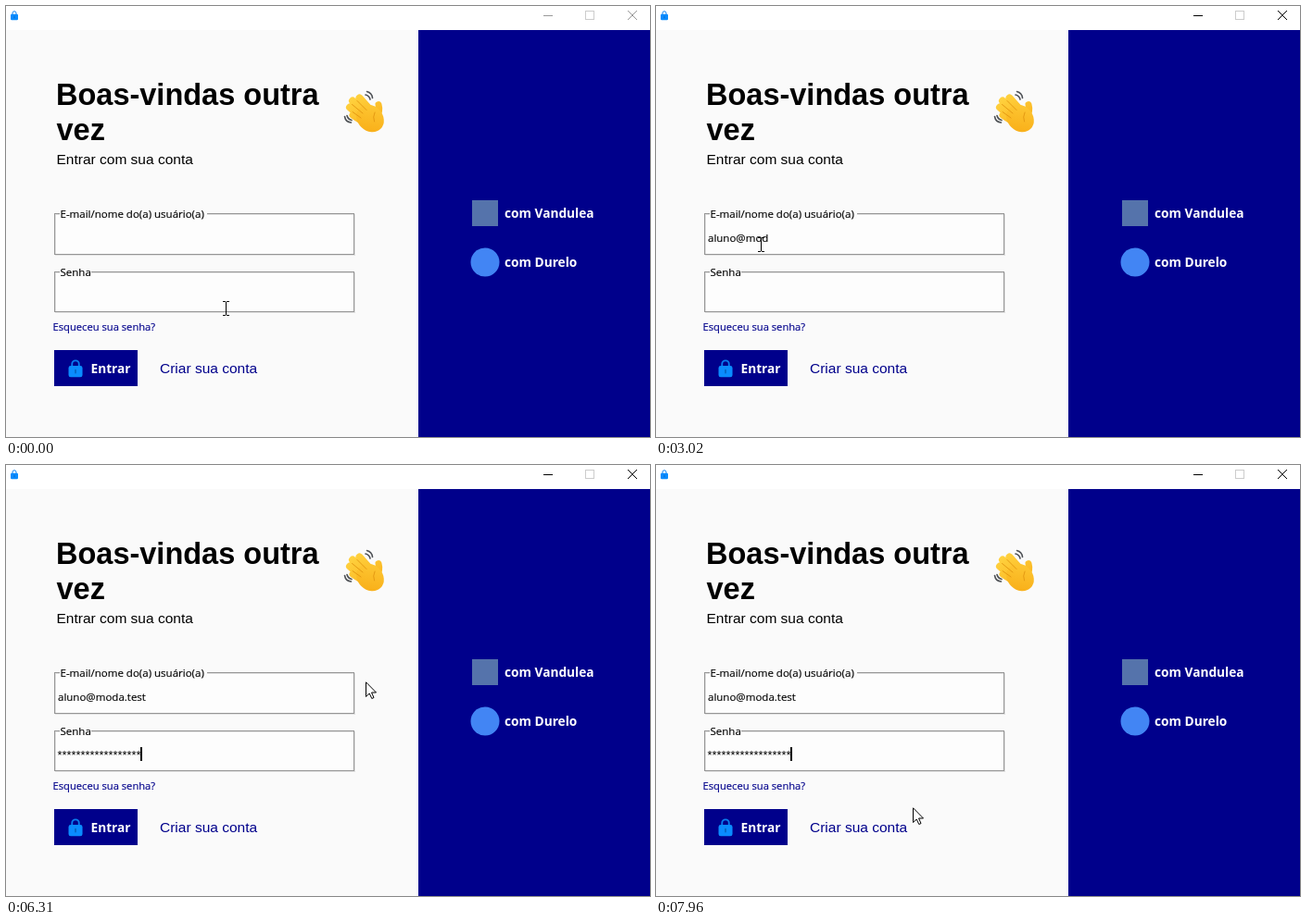
Recreate the animation shown at these times as an HTML page. Size 695x466 px, loop 8000 ms.

```html
<!DOCTYPE html>
<html lang="pt">
<head>
<meta charset="utf-8">
<title>Entrar</title>
<style>
  html, body { margin: 0; width: 100%; height: 100%; overflow: hidden; background: #fafafa; }
  svg { display: block; width: 695px; height: 466px; }
  text { white-space: pre; }
  .ui { font: 11.5px "Open Sans", "Noto Sans", sans-serif; stroke: #000; stroke-width: .15px; }
  .link { font-size: 11.2px; stroke: #00008b; }
  .bold { font: bold 13.7px "Open Sans", "Noto Sans", sans-serif; fill: #fff; }
  .body { font: 15.5px "Liberation Sans", sans-serif; }
  .title { font: bold 32.5px "Liberation Sans", sans-serif; }
  .stars { font: 12.85px "Liberation Sans", sans-serif; }
  .navy { fill: #00008b; }
  .crisp { shape-rendering: crispEdges; }
  .line { fill: none; }
  .groove { fill: #fdfdfd; stroke: #e1e1e1; }
  .edge { fill: none; stroke: #969696; }
</style>
</head>
<body>
<svg viewBox="0 0 695 466">
  <defs>
    <linearGradient id="skin" gradientUnits="userSpaceOnUse" x1="374" y1="98" x2="400" y2="134">
      <stop offset="0" stop-color="#ffd23f"/>
      <stop offset="1" stop-color="#f9b01a"/>
    </linearGradient>
    <g id="lock">
      <path d="M4 9V5.500a4 4 0 0 1 8 0V9" fill="none" stroke="#0a7ff0" stroke-width="2"/>
      <rect y="7.500" width="16" height="13" rx="2.500" fill="#0a8cff"/>
      <path d="M8 12.500v3" stroke="#0668c8" stroke-width="2" stroke-linecap="round"/>
    </g>
    <g id="sunken" class="line">
      <path d="M1 45V1H152" stroke="#000030" stroke-width="2"/>
      <path d="M151 1V44H1" stroke="#7f7fc5" stroke-width="2"/>
    </g>
  </defs>

  <rect width="695" height="466" fill="#fafafa"/>
  <rect width="695" height="26" fill="#fff"/>
  <rect x="445" y="26" width="250" height="440" class="navy"/>

  <use href="#lock" transform="translate(5 5) scale(.5)"/>
  <g id="controls" class="line">
    <path d="M580 10.500h10" class="crisp"/>
    <path d="M671 5l10 10M681 5l-10 10"/>
  </g>
  <rect x="625.500" y="5.500" width="9" height="9" class="line crisp" stroke="#ccc"/>

  <g class="title"><text x="54" y="107">Boas-vindas outra</text><text x="54.500" y="145">vez</text></g>
  <text class="body" x="54.500" y="171">Entrar com sua conta</text>

  <g stroke-linecap="round" fill="none">
    <g stroke="url(#skin)" stroke-width="8">
      <path d="M397 117L381.500 99.500M392 121L374 102.500M389 125L371 109.500M390 128L374.500 118"/>
      <path d="M400 122Q404 113 402 106.500" stroke-width="7"/>
    </g>
    <ellipse cx="393" cy="121.500" rx="16" ry="13.500" fill="url(#skin)" transform="rotate(45 393 121.500)"/>
    <path d="M389 112.500L379 102.500M385 116L373.500 106.500M383 121L374 114.500M398 115Q395.500 120 397.500 125" stroke="#e59a13"/>
    <path d="M388 96q4 1 5 5M389.500 92.500q5.500 1.500 6 7M368 118.500q1 4 5 5M365.500 119.500q1 6 7 6.500" stroke="#505357" stroke-width="1.600"/>
  </g>

  <g class="crisp">
    <rect class="groove" x="53.500" y="225.500" width="323" height="44"/>
    <rect class="edge" x="52.500" y="224.500" width="323" height="44"/>
    <rect class="groove" x="53.500" y="288.500" width="323" height="43"/>
    <rect class="edge" x="52.500" y="287.500" width="323" height="43"/>
  </g>
  <rect x="58" y="220" width="159" height="10" fill="#fafafa"/>
  <text class="ui" x="58.500" y="229">E-mail/nome do(a) usuário(a)</text>
  <rect x="58" y="283" width="34" height="10" fill="#fafafa"/>
  <text class="ui" x="58.500" y="292">Senha</text>
  <text id="email" class="ui" x="56" y="255"></text>
  <text id="password" class="stars" x="55.500" y="318"></text>
  <rect id="caret" class="crisp" width="2" height="15"/>

  <text class="ui link navy" x="50.500" y="351">Esqueceu sua senha?</text>
  <rect x="52" y="372" width="90" height="39" class="navy"/>
  <use href="#lock" transform="translate(67.500 382) scale(.94)"/>
  <text class="bold" x="91.500" y="397">Entrar</text>
  <text class="body navy" x="166" y="397">Criar sua conta</text>

  <use id="press0" href="#sunken" x="496" y="203"/>
  <g id="button0">
    <rect x="503" y="210" width="28" height="28" fill="#5573ab"/>
    <text class="bold" x="538" y="229">com Vandulea</text>
  </g>
  <use id="press1" href="#sunken" x="496" y="256"/>
  <g id="button1">
    <circle cx="517" cy="277" r="15.500" fill="#4285f4"/>
    <text class="bold" x="538" y="282">com Durelo</text>
  </g>

  <circle id="click" r="12" fill="#fff000" fill-opacity=".55"/>
  <g id="cursor">
    <path id="beam" class="line crisp" stroke="#000" d="M-3 -7.500h3M1 -7.500h3M.5 -7v14M-3 7.500h3M1 7.500h3"/>
    <path id="arrow" fill="#fff" stroke="#000" d="M.5 .8V16.500L4.200 13L6.800 18.500L9 17.500L6.500 12H11.500Z"/>
    <path id="hand" fill="#fff" stroke="#000" stroke-linejoin="round"
      d="M-1.500 2Q.5 -.5 2.500 2V7.500Q4.500 6 5.500 8Q7 6.800 8 9Q10 8.500 10.500 11V16Q10 19 8.500 20V23H0V20.500L-5.500 13.500Q-5 10.500 -1.500 13Z"/>
  </g>
</svg>
<script>
  const LOOP = 8000, STEP = 68;
  const el = id => document.getElementById(id);
  const between = (t, a, b) => t >= a && t < b;
  const show = (id, on) => el(id).style.display = on ? "" : "none";

  // Pointer moves: start, end, x, y
  const START = [237, 327];
  const MOVES = [
    [70, 480, 113, 258], [6030, 6580, 585, 216], [7060, 7300, 579, 275],
    [7610, 7820, 424, 357], [7890, 7890, 335, 380], [7960, 7960, 277, 370]
  ];
  // Clicks: start, end, x, y
  const CLICKS = [[550, 700, 111, 257], [6650, 6790, 585, 216], [7340, 7480, 579, 275]];
  const EMAIL = "aluno@moda.test";
  // Typing bursts: start, interval, characters
  const EMAIL_KEYS = [[1630, 95, 5], [2420, 0, 1], [2680, 155, 5], [3550, 100, 4]];
  const STAR_KEYS = [[4480, 55.5, 18]];

  function typed(t, bursts) {
    let count = 0;
    for (const [start, gap, max] of bursts)
      if (t >= start) count += gap ? Math.min(max, 1 + Math.floor((t - start) / gap)) : max;
    return count;
  }

  function pointer(t) {
    let [x, y] = START;
    for (const [start, end, toX, toY] of MOVES) {
      if (t < start) break;
      const steps = Math.round((end - start) / STEP) + 1;
      const p = Math.min(1, (Math.floor((t - start) / STEP) + 1) / steps);
      const eased = p * p * (3 - 2 * p);
      x += (toX - x) * eased;
      y += (toY - y) * eased;
    }
    return [Math.round(x), Math.round(y)];
  }

  function shapeAt(x, y) {
    if (between(x, 496, 648) && (between(y, 203, 248) || between(y, 256, 301))) return "hand";
    if (between(x, 54, 375) && (between(y, 226, 268) || between(y, 289, 331))) return "beam";
    return "arrow";
  }

  function drawCaret(t) {
    const inPassword = t >= 3950;
    const focused = inPassword ? 3950 : 550;
    const phase = (t - focused) % 900;
    const width = el(inPassword ? "password" : "email").getComputedTextLength();
    show("caret", t >= focused && phase < 615);
    el("caret").setAttribute("x", Math.round(55 + width));
    el("caret").setAttribute("y", inPassword ? 305 : 243);
  }

  function draw(t) {
    el("controls").setAttribute("stroke", t < 550 ? "#999" : "#000");
    el("email").textContent = EMAIL.slice(0, typed(t, EMAIL_KEYS));
    el("password").textContent = "*".repeat(typed(t, STAR_KEYS));
    drawCaret(t);

    const click = CLICKS.findIndex(([start, end]) => between(t, start, end));
    show("click", click >= 0);
    if (click >= 0) {
      el("click").setAttribute("cx", CLICKS[click][2]);
      el("click").setAttribute("cy", CLICKS[click][3]);
    }
    for (const i of [0, 1]) {
      const down = click === i + 1;
      show("press" + i, down);
      el("button" + i).setAttribute("transform", down ? "translate(1 1)" : "");
    }

    const [x, y] = pointer(t);
    const shape = shapeAt(x, y);
    for (const id of ["beam", "arrow", "hand"]) show(id, id === shape);
    el("cursor").setAttribute("transform", `translate(${x} ${y})`);
  }

  let origin;
  function frame(now) {
    origin ??= now;
    draw((now - origin) % LOOP);
    requestAnimationFrame(frame);
  }
  draw(0);
  requestAnimationFrame(frame);
</script>
</body>
</html>
```
